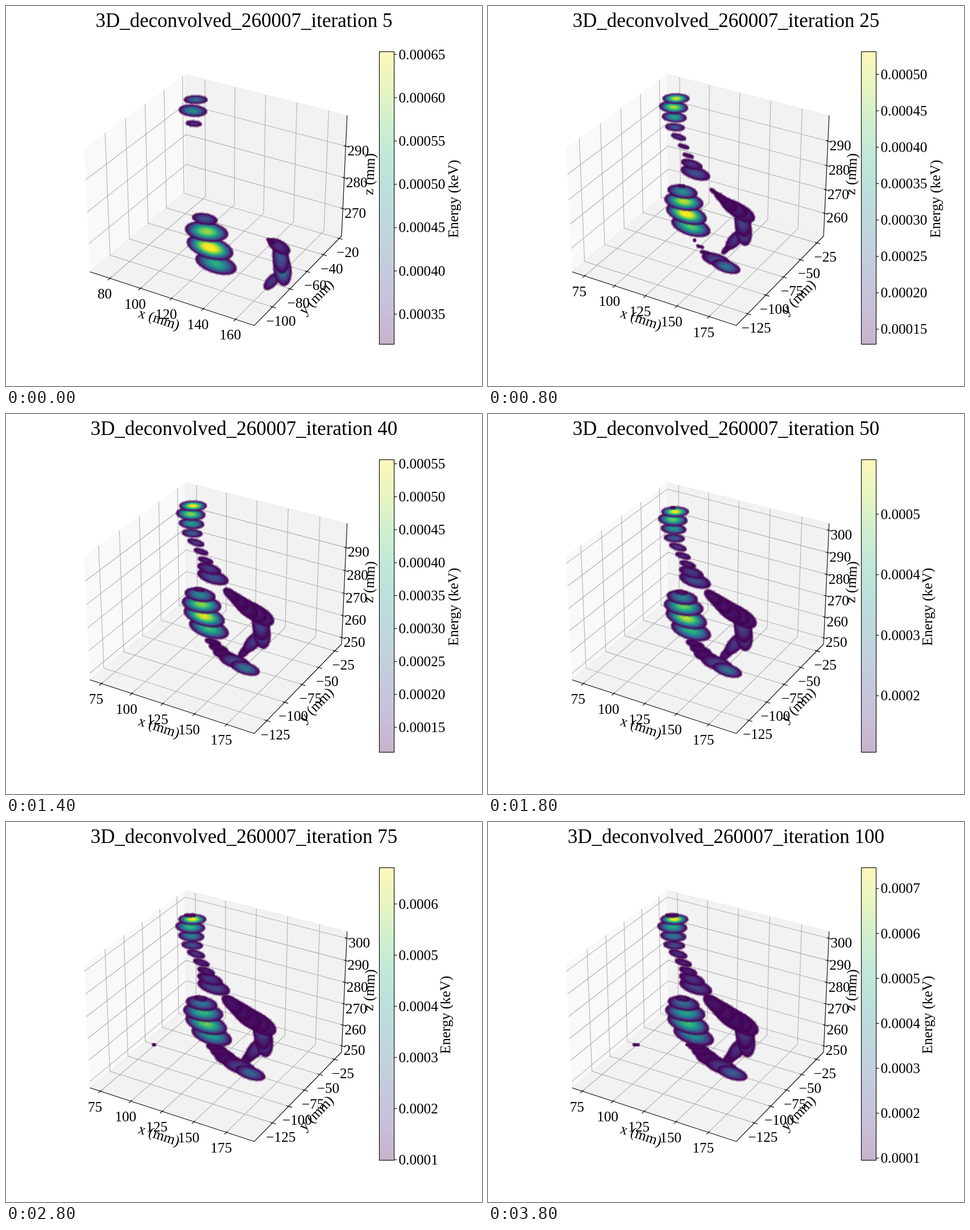
Animation, 837 px wide and 669 px high, one loop 4 s. Source, as an HTML page with a canvas:

```html
<!DOCTYPE html>
<html lang="en">
<head>
<meta charset="utf-8">
<title>Deconvolution iterations</title>
<style>
html, body { margin: 0; width: 100%; height: 100%; overflow: hidden; background: #fff; }
canvas { display: block; }
</style>
</head>
<body>
<canvas id="stage" width="837" height="669"></canvas>
<script>
const ctx = document.getElementById('stage').getContext('2d');
const SERIF = '"Liberation Serif", "Times New Roman", serif';
const VIRIDIS = ['440154', '482878', '3e4a89', '31688e', '26828e', '1f9e89', '35b779', '6ece58', 'b5de2b', 'fde725']
  .map(h => [0, 2, 4].map(i => parseInt(h.slice(i, i + 2), 16)));

// Energies are in units of 1e-5 keV
const decay = (step, rate) => Math.exp(-rate * step);
const sharpen = step => 1 + .256 * decay(step, .62);
const hottest = step => 53.9 + 1.73 * (step - 6) - .0104 * (step - 6) ** 2;
const energyRange = step => [8.4 + 23.13 / (1 + 1.026 * step), Math.max(52 * sharpen(step), hottest(step))];

// The volume grows as weaker voxels pass the threshold
const limitsAt = s => [
  [64.5 + (s > 4) + (s > 12) + 2.2 * decay(s, 3), 196 - 24.6 * decay(s, 1.35)],
  [-142.4 + 22.5 * decay(s, .58) - 9.4 * (s > 12), -14.2 - 2.7 * decay(s, .58) + 1.6 * (s > 12)],
  [260.9 - 5.33 * Math.min(s, 2) - 3.2 * (s > 6), 300.3 - .75 * decay(s, 3) + 2.8 * (s > 8)]
];

// Each track is a chain of slices between key points: x, y, radius, energy (placed for the REF step)
const REF = 9;
const TRACKS = [
  { slices: 9, flat: .55, along: true, gain: s => 1 + decay(s, .9),
    keys: [[420, 421, 26, 14], [450, 388, 34, 23], [446, 358, 37, 18], [422, 344, 44, 14], [396, 323, 34, 13]] },
  { slices: 5, flat: .46, keys: [[364, 405, 30, 13], [384, 427, 38, 13.5], [421, 451, 29, 29]] },
  { slices: 5, flat: .48, gain: sharpen,
    keys: [[357, 381, 38, 42], [346, 352, 39, 58], [342, 326, 34, 38], [340, 314, 17, 14]] },
  { slices: 8, flat: .46, keys: [[364, 293, 33, 23], [349, 260, 20, 13.5], [328, 224, 20, 20], [325, 186, 27, 48]] },
  { slices: 1, flat: .42, gain: hottest, keys: [[329, 172, 25, 1]] },
  { slices: 3, flat: .4, keys: [[325, 165, 25, 10.9], [252, 401, 20, 10.1], [344, 399, 20, 9.6]] }
];

const SCALE = 2780, CX = 373, CY = 330.8, DIST = 10;
const HALF = [.59525, .59525, .44645];
const U = [.866, .5, 0], V = [-.25, .433, .866], W = [.433, -.75, .5];
const dot = (a, b) => a[0] * b[0] + a[1] * b[1] + a[2] * b[2];
const clamp = (v, lo, hi) => Math.min(hi, Math.max(lo, v));

// Box fractions to pixels
function project(...f) {
  const d = f.map((t, i) => (2 * t - 1) * HALF[i]);
  const k = SCALE / (DIST - dot(W, d));
  return [CX + k * dot(U, d), CY - k * dot(V, d)];
}

// Pixel to box fractions on the plane at height fz
function unproject(px, py, fz) {
  const X = (px - CX) / SCALE, Y = (CY - py) / SCALE, dz = (2 * fz - 1) * HALF[2];
  const a = U.map((u, i) => u + X * W[i]), b = V.map((v, i) => v + Y * W[i]);
  const p = DIST * X - a[2] * dz, q = DIST * Y - b[2] * dz, det = a[0] * b[1] - a[1] * b[0];
  return [(p * b[1] - a[1] * q) / det / HALF[0], (a[0] * q - b[0] * p) / det / HALF[1]].map(d => (d + 1) / 2).concat(fz);
}

const toFrac = (v, [lo, hi]) => (v - lo) / (hi - lo);
const fromFrac = (t, [lo, hi]) => lo + t * (hi - lo);

function ticks([lo, hi], gap, margin = 0) {
  const list = [], pad = (hi - lo) * margin;
  for (let v = Math.ceil((lo + pad) / gap) * gap; v <= hi - pad; v += gap) list.push(v);
  return list;
}

function viridis(t) {
  const p = clamp(t, 0, 1) * 9, i = Math.min(8, Math.floor(p));
  return `rgb(${VIRIDIS[i].map((c, k) => Math.round(c + (VIRIDIS[i + 1][k] - c) * (p - i)))})`;
}

function path(points, stroke, fill) {
  ctx.beginPath();
  points.forEach(p => ctx.lineTo(...p));
  if (fill) { ctx.closePath(); ctx.fillStyle = fill; ctx.fill(); }
  if (stroke) { ctx.strokeStyle = stroke; ctx.stroke(); }
}

function text(str, x, y, { size = 25.2, align = 'center', angle = 0, drop = 8.3 } = {}) {
  ctx.save();
  ctx.translate(x, y);
  ctx.rotate(angle * Math.PI / 180);
  ctx.font = `${size}px ${SERIF}`;
  ctx.textAlign = align;
  ctx.fillStyle = '#000';
  ctx.fillText(str, 0, drop);
  ctx.restore();
}

function drawBox(lims) {
  const P = project, edge = '#ececec', grid = '#b0b0b0';
  ctx.lineWidth = 1.1;
  path([P(0, 0, 0), P(0, 1, 0), P(0, 1, 1), P(0, 0, 1)], null, '#f9f9f9');
  path([P(0, 1, 0), P(1, 1, 0), P(1, 1, 1), P(0, 1, 1)], edge, '#f2f2f2');
  path([P(0, 0, 0), P(1, 0, 0), P(1, 1, 0), P(0, 1, 0)], edge, '#f2f2f2');

  const gaps = [lims[0][1] - lims[0][0] < 125 ? 20 : 25, lims[1][0] > -140 ? 20 : 25, 10];
  const axes = [
    { line: t => [P(t, 0, 0), P(t, 1, 0), P(t, 1, 1)], mark: t => [P(t, -.02, 0), P(t, .012, 0)], at: t => P(t, 0, 0), off: [-9.3, 27.5] },
    { line: t => [P(1, t, 0), P(0, t, 0), P(0, t, 1)], mark: t => [P(.988, t, 0), P(1.02, t, 0)], at: t => P(1, t, 0), off: [15, 24.5] },
    { line: t => [P(0, 0, t), P(0, 1, t), P(1, 1, t)], mark: t => [P(.988, 1, t), P(1.02, 1, t)], at: t => P(1, 1, t), off: [22, 8] }
  ];
  const marks = lims.map((lim, i) => ticks(lim, gaps[i], .02));
  axes.forEach((a, i) => marks[i].forEach(v => path(a.line(toFrac(v, lims[i])), grid)));
  path([P(0, 0, 0), P(1, 0, 0), P(1, 1, 0), P(1, 1, 1)], '#000');
  axes.forEach((a, i) => marks[i].forEach(v => {
    const t = toFrac(v, lims[i]), [x, y] = a.at(t);
    path(a.mark(t), '#000');
    text(String(v).replace('-', '\u2212'), x + a.off[0], y + a.off[1]);
  }));
  text('x (mm)', 268.5, 553, { angle: 18, drop: 6 });
  text('y (mm)', 547, 514, { angle: -45.7, drop: 6 });
  text('z (mm)', 641, 296, { angle: -87.3, drop: 6 });
}

function drawSlice(x, y, rx, ry, tilt, heat) {
  ctx.save();
  ctx.translate(x, y);
  ctx.rotate(tilt);
  // Rim of translucent round markers
  const n = Math.max(4, Math.round((rx + ry) * .9));
  ctx.fillStyle = 'rgba(68,1,84,.38)';
  for (let i = 0; i < n; i++) {
    const a = i / n * 2 * Math.PI, wobble = .5 * Math.sin(i * 2.4);
    ctx.beginPath();
    ctx.arc(Math.max(0, rx - 2.5 + wobble) * Math.cos(a), Math.max(0, ry - 2.5 + wobble) * Math.sin(a), 3, 0, 7);
    ctx.fill();
  }
  const bx = rx - 1.8, by = ry - 1.8;
  if (bx > 2 && by > 1) {
    const g = ctx.createRadialGradient(0, 0, 0, 0, 0, 1);
    for (let i = 0; i <= 10; i++) g.addColorStop(i / 10, viridis(heat * (1 - i * i / 100) ** 1.3));
    ctx.scale(bx, by);
    ctx.fillStyle = g;
    ctx.beginPath();
    ctx.arc(0, 0, 1, 0, 7);
    ctx.fill();
  }
  ctx.restore();
}

function drawTrack({ slices, flat, along, keys, gain = () => 1 }, step, lims) {
  const ref = limitsAt(REF), range = energyRange(step);
  const zoom = (ref[0][1] - ref[0][0]) / (lims[0][1] - lims[0][0]);
  for (let i = 0; i < slices; i++) {
    const t = slices > 1 ? i / (slices - 1) * (keys.length - 1) : 0;
    const k = clamp(Math.floor(t), 0, Math.max(0, keys.length - 2));
    const a = keys[k], b = keys[k + 1] || a;
    const [x, y, radius, base] = a.map((v, j) => v + (b[j] - v) * (t - k));
    const energy = base * gain(step);
    if (energy <= range[0]) continue;

    const z = Math.max(265, 298 - (y - 172) * .175);
    const f = unproject(x, y, toFrac(z, ref[2])).map((v, j) => toFrac(fromFrac(v, ref[j]), lims[j]));
    const r = radius * zoom * Math.sqrt(1 - (range[0] / energy) ** 2);
    const dx = b[0] - a[0], dy = b[1] - a[1];
    const tilt = along ? Math.atan(dy / dx) : clamp(Math.atan(dx / (dy || 1)), -.3, .3) * (slices > 3);
    drawSlice(...project(...f), r, Math.max(3, r * flat), tilt, toFrac(energy, range));
  }
}

function drawBar(step) {
  const x = 656.5, w = 26, top = 80.5, h = 515;
  const range = energyRange(step), coarse = step >= 8;
  const g = ctx.createLinearGradient(0, top + h, 0, top);
  for (let i = 0; i <= 9; i++) g.addColorStop(i / 9, viridis(i / 9));
  ctx.globalAlpha = .3;
  ctx.fillStyle = g;
  ctx.fillRect(x, top, w, h);
  ctx.globalAlpha = 1;
  ctx.strokeStyle = '#000';
  ctx.strokeRect(x, top, w, h);
  ticks(range, coarse ? 10 : 5).forEach(v => {
    const y = top + h * (1 - toFrac(v, range));
    path([[x + w, y], [x + w + 5, y]], '#000');
    text((v / 1e5).toFixed(coarse ? 4 : 5), 690.5, y, { align: 'left' });
  });
  text('Energy (keV)', coarse ? 774 : 788, 339.5, { angle: -90, drop: 6.6 });
}

function draw(now) {
  const step = Math.floor(now / 200) % 20;
  const lims = limitsAt(step);
  ctx.fillStyle = '#fff';
  ctx.fillRect(0, 0, 837, 669);
  text(`3D_deconvolved_260007_iteration ${5 * (step + 1)}`, 418.5, 37, { size: 35, drop: 0 });
  drawBox(lims);
  TRACKS.forEach(track => drawTrack(track, step, lims));
  drawBar(step);
}

const start = performance.now();
function tick() {
  draw(performance.now() - start);
  requestAnimationFrame(tick);
}
tick();
</script>
</body>
</html>
```
